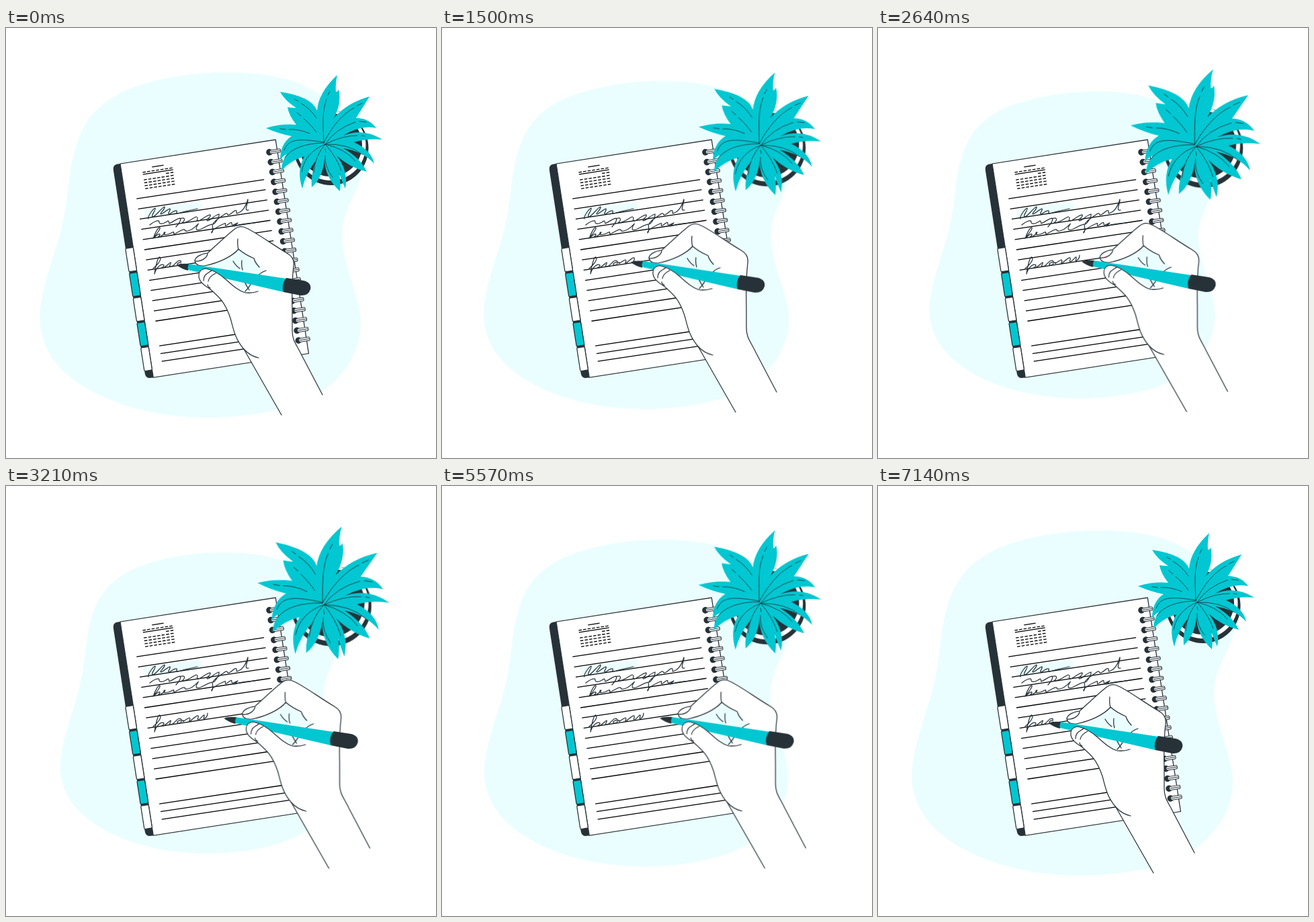
Animation, 640 px wide and 640 px high, one loop 7.21 s. Source, as an HTML page:

```html
<!DOCTYPE html>
<html lang="en">
<head>
<meta charset="utf-8">
<title>Writing in a notebook</title>
<style>
  html, body { margin: 0; width: 100%; height: 100%; overflow: hidden; background: #fff; }
  svg { display: block; width: 100%; height: 100%; }
  .ink { fill: none; stroke: #263238; stroke-width: 1.25; stroke-linecap: round; stroke-linejoin: round; }
  .fine { stroke-width: 1; }
  .rule { fill: none; stroke: #000; stroke-width: 1.3; }
  .vein { fill: none; stroke: #263238; stroke-width: .8; stroke-linecap: round; }
  .dark { fill: #263238; }
  .teal { fill: #00c7d1; }
  .pale { fill: #ebfeff; }
  .white { fill: #fff; }
  .blob, .pot, .leaves, .write {
    animation: 7210ms infinite cubic-bezier(.3642, 0, .6358, 1);
  }
  .blob { animation-name: shrink; transform-origin: 289px 323px; }
  .pot { animation-name: swell; transform-origin: 484px 178px; }
  .leaves { animation-name: sway; transform-origin: 476.7px 146px; }
  .write { animation-name: write; animation-timing-function: linear; }
  @keyframes shrink { 0%, 99.03%, 100% { transform: none; } 49.51% { transform: scale(.869); } }
  @keyframes swell { 0%, 99.03%, 100% { transform: scale(1); } 49.51% { transform: scale(1.08); } }
  @keyframes sway {
    0%, 99.03%, 100% { transform: rotate(0deg) scale(1); }
    49.51% { transform: rotate(3deg) scale(1.145); }
  }
  @keyframes write {
    0%, 99.03%, 100% { transform: translate(0, 0); }
    11.93% { transform: translate(7.5px, -6px); }
    22.19% { transform: translate(30px, -4px); }
    28.71% { transform: translate(49px, -8px); }
    36.06% { transform: translate(49px, -5px); }
    43.13% { transform: translate(53px, -6px); }
    44.52% { transform: translate(70.5px, -7px); }
    49.9% { transform: translate(72.5px, -7.5px); }
    76.2% { transform: translate(72.5px, -7.5px); animation-timing-function: ease; }
  }
</style>
</head>
<body>
<svg viewBox="0 0 640 640">
  <defs>
    <clipPath id="written"><rect class="write" x="100" y="300" width="161" height="120"/></clipPath>
  </defs>

  <path class="blob pale" d="M320 66C380 65 425 74 455 92C490 112 536 150 534 195C531 240 500 265 500 310C502 360 528 400 528 440C528 480 505 515 475 538C430 570 360 580 295 580C200 578 130 550 90 515C62 490 50 460 50 430C52 385 72 340 82 300C95 245 92 215 103 180C115 135 140 110 180 92C225 74 275 67 320 66Z"/>

  <g id="book" transform="translate(170 202) rotate(-8.8)">
    <path class="dark" d="M0 0H-4Q-11.5 0-11.5 8V314Q-11.5 322-4 322H0Z"/>
    <rect class="white" width="234" height="322"/>
    <rect class="ink" width="234" height="322"/>
    <path class="pale" d="M24 73L110 75L109 87L26 88Z"/>
    <path class="rule" d="M46 12H63.500M31 20.800H76.500"/>
    <path class="rule" stroke-dasharray="4.600 2.100" d="M31 17.900H77M65 24.700H77M31 29.200H77M31 33.600H77M31 38H77M31 42.400H77"/>
  </g>

  <g class="ink">
    <path d="M212 284C210 281 219 269 222 268C224 270 214 281 219 281C224 279 231 268 236 266C238 269 227 277 231 277C236 275 241 269 244 269C246 271 239 277 243 277C247 275 250 271 254 272C256 274 251 276 256 276C265 273 275 271 285 269"/>
    <path d="M214 293C220 288 228 285 228 288C227 291 231 293 238 289C243 285 242 288 243 291C250 288 255 283 259 283C262 285 256 293 253 296M259 284C266 281 268 285 262 290C272 290 277 283 283 281C288 282 281 288 287 287C294 284 299 278 304 278C306 282 296 285 300 287C306 285 310 279 317 277C318 281 311 292 308 292C308 288 320 281 327 276C331 275 328 279 332 278C338 275 340 270 343 272C344 275 341 277 346 275C352 273 358 264 360 255C361 260 353 273 361 271"/>
    <path d="M218 313C222 310 231 298 229 297C226 296 219 311 220 313C224 307 230 305 229 308C228 311 223 312 230 310C238 306 238 302 235 305C233 309 242 308 248 304C252 302 247 308 252 306C258 303 263 299 266 300C266 303 270 303 276 300C283 296 288 289 286 292C280 301 284 302 291 299C298 295 304 292 307 292C308 297 308 304 306 305C305 301 314 296 325 291C329 289 324 296 328 294C333 291 335 288 336 290C335 296 341 292 345 290L340 295C350 291 360 291 370 290"/>
    <path clip-path="url(#written)" d="M219 358C226 352 232 345 229 341C226 339 222 358 221 366C224 355 232 350 235 353C236 356 228 358 234 357C240 355 242 350 245 349C247 350 240 356 246 355C252 353 253 347 258 346C263 346 262 353 257 353C252 353 256 347 264 349C261 353 268 347 273 345C276 346 270 352 274 350C279 346 284 341 286 342C288 344 282 350 288 347C292 344 294 340 295 341C296 344 292 348 296 346C299 344 300 340 300 338"/>
  </g>

  <g class="pot">
    <circle class="dark" cx="484" cy="178.500" r="55.500"/>
    <circle class="white" cx="483.500" cy="175" r="52"/>
    <circle class="dark" cx="483" cy="174" r="47"/>
  </g>
  <g class="leaves">
    <path class="teal" d="M463 123Q465 96 493 70Q490 82 491 95Q494 95 495 91Q500 112 488 134Q508 111 541 102Q533 115 521 134Q540 134 551 149Q528 144 502 160Q532 148 560 166Q538 164 518 170Q544 182 548 202Q532 184 502 179Q528 194 537 214Q512 208 492 190Q510 212 505 239Q497 222 491 200Q500 224 497 243Q474 222 474 194Q472 222 455 237Q453 218 462 196Q446 216 441 239Q432 212 444 191Q424 197 410 212Q410 198 418 188Q412 190 408 197Q408 172 425 161Q405 157 387 149Q410 142 432 144Q421 130 419 118Q426 119 432 119Q415 108 408 95Q455 102 463 123Z"/>
    <path class="vein" d="M473 171C472 145 470 125 477 106M479 100L482 94M473 171C483 150 500 128 518 119M522 116L530 112M475 173Q490 150 520 140M526 139L536 140M475 173Q500 160 523 160M529 160L534 161M475 173Q510 172 530 188M475 173Q505 180 520 198M475 173Q492 192 499 212M475 180L476 185M475 190Q474 207 486 222M475 173Q460 190 458 215M475 173Q445 185 440 214M473 171Q430 172 415 193M473 170C435 164 420 165 414 182M452 157Q435 150 421 151M416 151L408 150M462 155Q452 142 443 135M439 131L433 126M462 134Q453 120 439 112M435 109L430 106"/>
  </g>

  <g class="write">
    <path class="white" d="M281 347C281 341 290 336 300 335C310 326 328 309 338 301Q348 292 358 298C372 304 396 322 418 335Q430 342 428 354Q425 380 426 420V450C426 466 432 470 440 487L471 546L410 576L354 478C340 462 338 446 334 432C326 408 318 401 303 388L286 368L297 359L284 353Z"/>
    <path class="pale" d="M306 353Q330 345 346 330Q365 338 374 349L386 362Q368 378 362 390L352 391Q330 372 310 362Z"/>
    <path class="ink" d="M410 576L354 478M471 546L440 487C432 470 426 466 426 450V420Q425 380 428 354Q430 342 418 335C396 322 372 304 358 298Q348 292 338 301C328 309 310 326 300 335C290 336 281 341 281 347Q283 355 295 354C316 350 337 340 346 329Q355 337 369 343Q371 350 377 356M281 347C292 348 300 341 300 335M346 330Q344 323 345 314M338 347Q342 354 348 358M351 346Q350 354 352 360M387 361Q378 364 374 370M351 367Q354 378 362 390M368 373Q364 384 356 392"/>
    <path class="teal" d="M271 351L417 373L413 393L271 360Z"/>
    <path class="dark" d="M254 353Q258 350 272 351Q270 356 271 361Q260 358 254 353ZM417 372L443 376Q455 379 453 389Q450 399 438 398L413 393Q409 382 417 372Z"/>
    <path class="white" d="M287 367Q288 359 297 358C308 360 318 366 328 375C338 384 346 393 358 395L350 450L354 478C340 462 338 446 334 432C326 408 318 401 303 388C293 382 286 376 287 367Z"/>
    <path class="ink" d="M375 392Q366 395 356 394C346 391 338 384 328 375C318 366 308 360 297 358Q288 359 287 367C286 376 293 382 303 388C318 401 326 408 334 432C338 446 340 462 354 478Q363 488 376 491M294 376C294 367 299 366 306 361M301 377Q302 370 312 365M300 382Q300 385 304 387"/>
  </g>
</svg>
<script>
  const book = document.getElementById('book');
  const add = (tag, attrs) => {
    const node = document.createElementNS(book.namespaceURI, tag);
    for (const name in attrs) node.setAttribute(name, attrs[name]);
    book.append(node);
  };

  for (let i = 0; i < 16; i++) {
    const y = i < 13 ? 55.2 + i * 15.36 : 276.8 + (i - 13) * 11.7;
    add('path', { class: 'rule', d: `M16 ${y}l192 .8` });
  }
  for (let i = 0; i < 5; i++) {
    const box = { x: -11.7, y: 126 + i * 37.4, width: 11.7, height: 35, rx: 1.5 };
    add('rect', { class: i % 2 ? 'teal' : 'white', ...box });
    add('rect', { class: 'ink', ...box });
  }
  for (let i = 0; i < 20; i++) {
    const y = 17 + i * 14.92;
    add('circle', { class: 'dark', cx: 222, cy: y, r: 4.8 });
    const bar = { x: 222.5, y: y - 2.6, width: 16.5, height: 5.2, rx: 2 };
    add('rect', { class: 'white', ...bar });
    add('path', { class: 'ink fine', d: `M224 ${y}H238` });
    add('rect', { class: 'ink fine', ...bar });
  }
</script>
</body>
</html>
```
